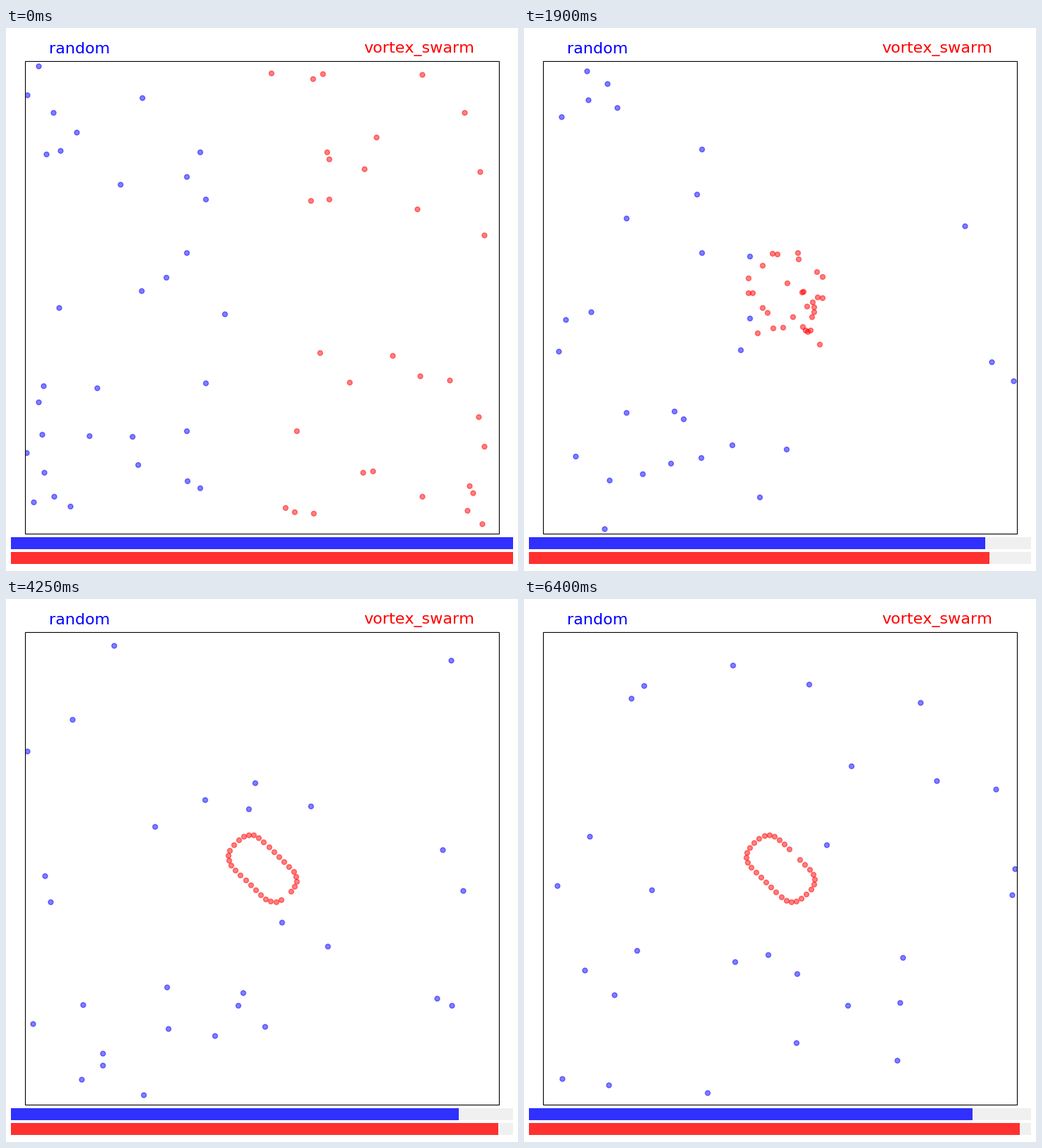
Write a matplotlib script that moves like this. It is 726 by 771 pixels and loops after 6450 ms.

```python
import numpy as np
import matplotlib.pyplot as plt
from matplotlib.animation import FuncAnimation
from matplotlib.patches import Rectangle

plt.rcParams["text.kerning_factor"] = 6

W, H, DPI = 726, 771, 100
FRAMES, STEP = 129, 50
TEAM = 32
LEFT, TOP, BOX_W, BOX_H = 27.2, 46.8, 672, 671
CORNER = np.array([LEFT, TOP])
SPAN = np.array([BOX_W, BOX_H])
CENTER = np.array([363.3, 382.3])
CAP = 6.72  # top speed per axis, pixels per frame
LAP = 34    # frames per orbit
BLUE_LOST, RED_LOST = [11, 30, 50, 97], [18]

rng = np.random.default_rng(12)


def swing(u):
    """Back and forth at constant speed, with short soft turns at both ends."""
    s = LAP / 4 - abs((u + 0.5) % 1 - 0.5) * LAP
    a = abs(s)
    return np.sign(s) * (a - np.maximum(a - 5.8, 0) ** 2 / 5.4) / 7.15


def ring(n):
    """Orbit slots: y runs ahead of x, which slants the loop."""
    u = 0.162 + np.arange(1, TEAM + 1) / TEAM + (n - FRAMES + 1) / LAP
    size = 0.96 + 0.05 * np.cos(2 * np.pi * (n - 85) / 46)
    return CENTER + size * np.stack([48 * swing(u), 47 * swing(u + 0.176)], -1)


def swarm_path():
    """Each member chases its orbit slot with capped speed on both axes."""
    x = rng.uniform(375, 695, TEAM)
    side = rng.choice([-1, 1], TEAM)
    y = CENTER[1] + side * rng.uniform(60, 332, TEAM)
    path = [np.stack([x, y], -1)]
    for n in range(1, FRAMES):
        p = path[-1]
        path.append(p + np.clip(ring(n) - p, -CAP, CAP))
    return np.array(path)


def walk_path():
    """Smooth random drift that wraps around the box."""
    p = CORNER + rng.uniform(0, 1, (TEAM, 2)) * SPAN * [0.49, 1]
    v = rng.normal(0, 3, (TEAM, 2))
    path = []
    for _ in range(FRAMES):
        path.append((p - CORNER) % SPAN + CORNER)
        v = np.clip(0.9 * v + rng.normal(0, 1.3, v.shape), -CAP, CAP)
        p = p + v
    return np.array(path)


SWARM, WALK = swarm_path(), walk_path()

fig = plt.figure(figsize=(W / DPI, H / DPI), dpi=DPI, facecolor="white")
ax = fig.add_axes([0, 0, 1, 1])
ax.set(xlim=(0, W), ylim=(H, 0))
ax.axis("off")

box = Rectangle(CORNER, BOX_W, BOX_H, fill=False, ec="black", lw=0.8, zorder=5)
ax.add_patch(box)


def add_team(name, x, base, color, fill, y):
    ax.text(x, base, name, color=color, size=16, ha="center", va="baseline",
            family="DejaVu Sans")
    ax.add_patch(Rectangle((7, y), 712, 17, fc="#f0f0f0", lw=0))
    bar = ax.add_patch(Rectangle((7, y), 712, 17, fc=fill, lw=0))
    dots, = ax.plot([], [], "o", color=color, alpha=0.5, ms=5, mew=1)
    dots.set_clip_path(box)
    return dots, bar


blue, blue_bar = add_team("random", 104, 35.5, "blue", "#3030ff", 723)
red, red_bar = add_team("vortex_swarm", 586, 34.5, "red", "#ff3030", 744)

# Bar widths at a few moments
BEATS = [0, 13, 22, 38, 63, 85, 109, 128]
BLUE_LIFE = [712, 709, 676, 647, 621, 635, 629, 629]
RED_LIFE = [712, 709, 675, 653, 657, 691, 693, 696]


def show(dots, path, lost, n):
    alive = TEAM - np.searchsorted(lost, n, side="right")
    dots.set_data(*path[n, :alive].T)


def draw(n):
    show(blue, WALK, BLUE_LOST, n)
    show(red, SWARM, RED_LOST, n)
    blue_bar.set_width(np.interp(n, BEATS, BLUE_LIFE))
    red_bar.set_width(np.interp(n, BEATS, RED_LIFE))
    return blue, red, blue_bar, red_bar


anim = FuncAnimation(fig, draw, frames=FRAMES, interval=STEP, repeat=True,
                     repeat_delay=0)
plt.show()
```
